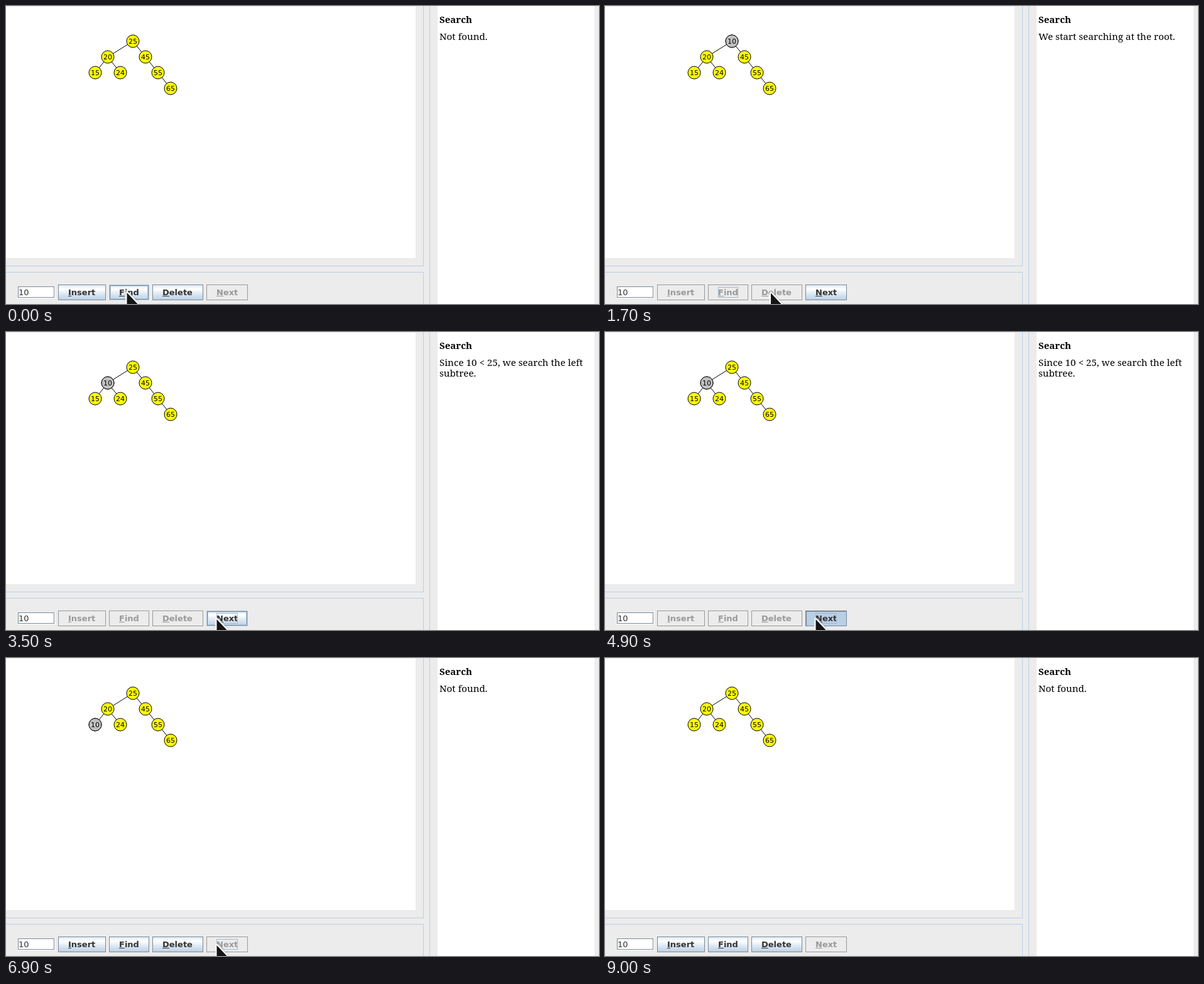
These frames come from a looping animation (944x474 px, 9200 ms). An HTML page with a canvas:

```html
<!DOCTYPE html>
<html lang="en">
<head>
<meta charset="utf-8">
<title>Binary search tree: find</title>
<style>
html, body { margin: 0; width: 944px; height: 474px; overflow: hidden; background: #ececec; }
canvas { display: block; }
</style>
</head>
<body>
<canvas id="stage" width="944" height="474"></canvas>
<script>
const ctx = document.getElementById('stage').getContext('2d');
const LOOP = 9200, TICK = 100;
const SANS = '"DejaVu Sans", sans-serif';
const SERIF = '"Noto Serif", serif';
const BG = '#ececec', PALE = '#b8cfe5', DARK = '#7a8a99', GREY = '#999999';
const KEY = 10;

// Moments when a button is released, each starting the next search step
const [START, STEP1, STEP2, DONE] = [1000, 2900, 5100, 6900];

const point = (x, y) => ({ x, y });
const within = (t, from, to) => t >= from && t < to;

// Insert the values in order; x follows the sorted rank, y the depth
function buildTree(values) {
  const sorted = [...values].sort((a, b) => a - b);
  const nodes = [];
  for (const value of values) {
    let parent = null, next = nodes[0], depth = 0;
    while (next) {
      parent = next;
      next = value < parent.value ? parent.left : parent.right;
      depth++;
    }
    const node = { value, parent, x: 142 + 20 * sorted.indexOf(value), y: 56 + 25 * depth };
    if (parent) parent[value < parent.value ? 'left' : 'right'] = node;
    nodes.push(node);
  }
  return nodes;
}

const tree = buildTree([25, 20, 45, 15, 24, 55, 65]);
const root = tree[0];

// Legs are [start, duration, destination], each travelled at constant speed
function travel(from, legs, t) {
  return legs.reduce((p, [start, duration, to]) => {
    const k = Math.min(1, Math.max(0, (t - start) / duration));
    return point(p.x + (to.x - p.x) * k, p.y + (to.y - p.y) * k);
  }, from);
}

const seekerStart = point(-12, 26);
const seekerLegs = [
  [1200, 300, root],
  [STEP1, 600, root.left],
  [STEP2, 500, root.left.left],
  [DONE, 200, point(-18, 175)]
];
const cursorStart = point(189, 451);
const cursorLegs = [
  [1600, 200, point(332, 452)],
  [7700, 300, point(131, 178)],
  [8000, 200, point(65, 21)],
  [8300, 100, point(-99, -99)]
];

function message(t) {
  if (t < START || t >= DONE) return ['Not found.'];
  if (t < STEP1) return ['We start searching at the root.'];
  const { value } = t < STEP2 ? root : root.left;
  return [`Since ${KEY} < ${value}, we search the left`, 'subtree.'];
}

function rect(x, y, w, h, color) {
  ctx.fillStyle = color;
  ctx.fillRect(x, y, w, h);
}

function frame(x, y, w, h, color) {
  ctx.strokeStyle = color;
  ctx.lineWidth = 1;
  ctx.strokeRect(x + 0.5, y + 0.5, w - 1, h - 1);
}

function text(str, x, y, font, color = '#000', align = 'left') {
  ctx.font = font;
  ctx.fillStyle = color;
  ctx.textAlign = align;
  ctx.fillText(str, x, y);
}

function drawNode(value, { x, y }, fill) {
  ctx.beginPath();
  ctx.arc(x, y, 10, 0, 2 * Math.PI);
  ctx.fillStyle = fill;
  ctx.fill();
  ctx.strokeStyle = '#000';
  ctx.lineWidth = 1;
  ctx.stroke();
  text(value, x, y + 4, '11px ' + SANS, '#000', 'center');
}

function drawTree(t) {
  ctx.strokeStyle = '#000';
  ctx.lineWidth = 1;
  ctx.beginPath();
  for (const { x, y, parent } of tree) {
    if (!parent) continue;
    ctx.moveTo(parent.x, parent.y);
    ctx.lineTo(x, y);
  }
  ctx.stroke();
  for (const node of tree) drawNode(node.value, node, '#ffff00');
  drawNode(KEY, travel(seekerStart, seekerLegs, t), '#c0c0c0');
}

function button(label, x, w, { enabled, hover, pressed, focus }) {
  const y = 443, h = 25;
  if (pressed) {
    rect(x, y, w, h, PALE);
    frame(x, y, w, h, DARK);
    rect(x, y, w, 2, DARK);
    rect(x, y, 2, h, DARK);
  } else if (enabled) {
    const shade = ctx.createLinearGradient(0, y, 0, y + h);
    shade.addColorStop(0, '#dde8f3');
    shade.addColorStop(0.3, '#ffffff');
    shade.addColorStop(0.6, '#dde8f3');
    shade.addColorStop(1, PALE);
    rect(x, y, w, h, shade);
    frame(x, y, w, h, hover ? PALE : DARK);
    if (hover) {
      frame(x + 1, y + 1, w - 2, h - 2, DARK);
      frame(x + 2, y + 2, w - 4, h - 4, PALE);
    }
  } else frame(x, y, w, h, GREY);

  const font = 'bold 13px ' + SANS, color = enabled ? '#333333' : GREY;
  ctx.font = font;
  const textWidth = Math.round(ctx.measureText(label).width);
  const left = x + Math.floor((w - textWidth) / 2);
  text(label, left, 460, font, color);
  rect(left, 461, Math.round(ctx.measureText(label[0]).width), 1, color);
  if (focus) frame(left, 447, textWidth, 17, '#a3b8cc');
}

function drawControls(t) {
  rect(19, 446, 59, 19, '#fff');
  frame(19, 446, 58, 18, DARK);
  text(KEY, 20, 460, '13px ' + SANS, '#333333');

  const stepping = within(t, START, DONE);
  const heldUntil = release => within(t, release - 200, release);
  button('Insert', 83, 76, { enabled: !stepping });
  button('Find', 164, 64, {
    enabled: !stepping,
    hover: t < START,
    pressed: heldUntil(START),
    focus: within(t, START, STEP1)
  });
  button('Delete', 233, 81, { enabled: !stepping });
  button('Next', 319, 66, {
    enabled: stepping,
    hover: t >= 1800,
    pressed: within(t, STEP1 - 100, STEP1) || heldUntil(STEP2) || heldUntil(DONE),
    focus: within(t, STEP1, 9000)
  });
}

function drawCursor({ x, y }) {
  const arrow = new Path2D('M3.5 5V43L11 36.5L17 49L23 46.5L17 35L31 34Z');
  ctx.save();
  ctx.translate(x, y);
  ctx.lineJoin = 'round';
  ctx.lineWidth = 4.5;
  ctx.strokeStyle = '#fff';
  ctx.shadowColor = 'rgba(0,0,0,.3)';
  ctx.shadowBlur = 2;
  ctx.shadowOffsetX = ctx.shadowOffsetY = 1;
  ctx.stroke(arrow);
  ctx.shadowColor = 'transparent';
  ctx.fillStyle = '#151515';
  ctx.fill(arrow);
  ctx.restore();
}

function drawPanels() {
  rect(0, 0, 944, 474, BG);
  rect(0, 1, 652, 400, '#fff');
  rect(687, 0, 250, 474, '#fff');
  frame(-1, -1, 666, 415, PALE);
  frame(-1, 423, 666, 60, PALE);
  rect(674, 0, 1, 474, PALE);
}

function draw(now) {
  const t = Math.floor(now % LOOP / TICK) * TICK;
  drawPanels();
  drawTree(t);
  drawControls(t);
  text('Search', 690, 27, 'bold 15px ' + SERIF);
  message(t).forEach((line, i) => text(line, 690, 54 + 17 * i, '15.2px ' + SERIF));
  drawCursor(travel(cursorStart, cursorLegs, t));
  requestAnimationFrame(() => draw(performance.now() - begin));
}

const begin = performance.now();
draw(0);
</script>
</body>
</html>
```
